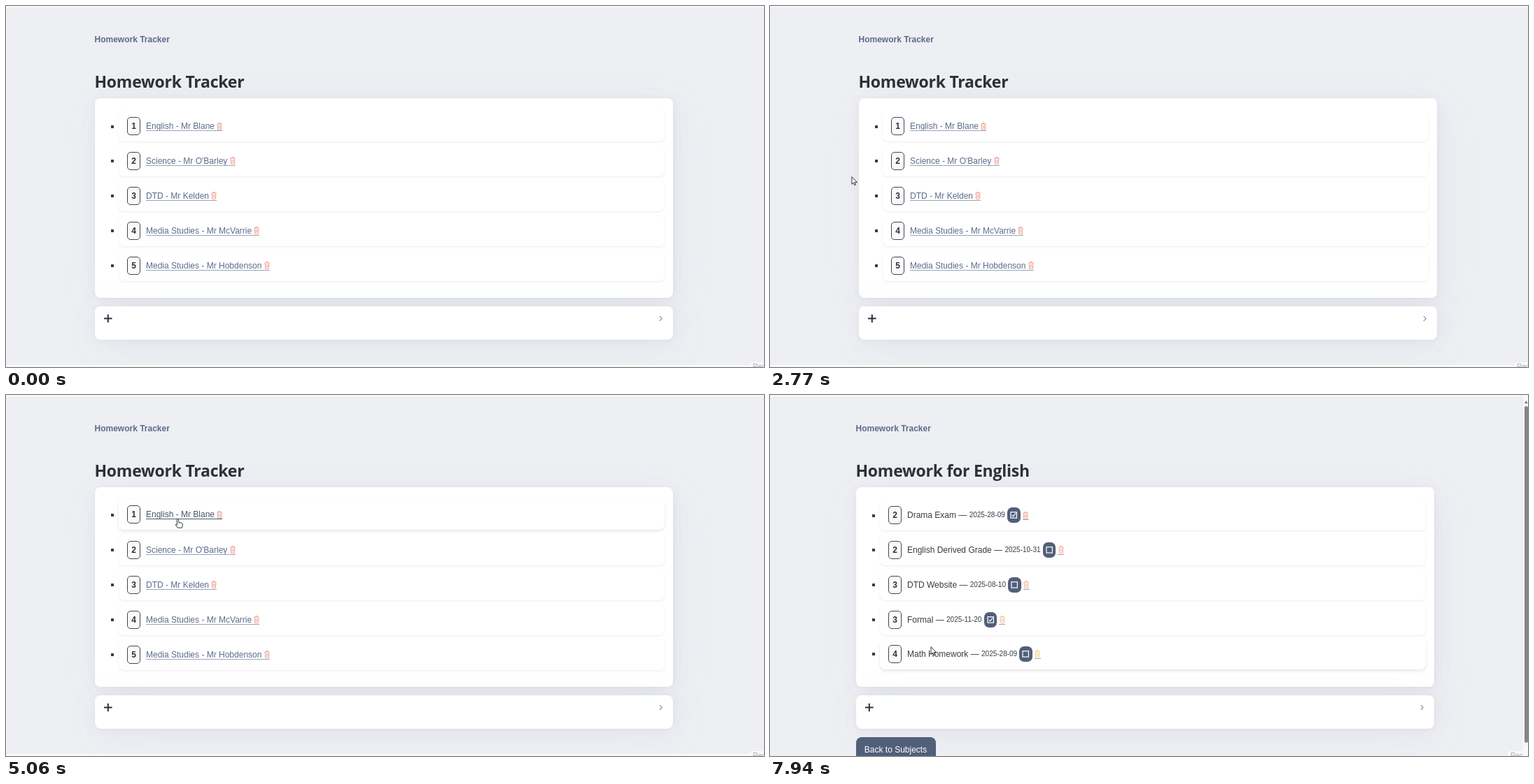
These frames come from a looping animation (1083 px wide and 517 px high, 8 s). An HTML page:

```html
<!DOCTYPE html>
<html lang="en">
<head>
<meta charset="utf-8">
<title>Homework Tracker</title>
<style>
html, body { margin: 0; width: 100%; height: 100%; overflow: hidden; }
body { position: relative; background: #eeeff3; color: #373c44; font: 12px/20px "Liberation Sans", Arial, sans-serif; }
.page, .page > *, .row, .cursor { position: absolute; }
.page { left: 0; top: 0; width: 1083px; height: 517px; overflow: hidden; }
.top, .bottom { left: 0; width: 100%; background: #f9f9fa; }
.top { top: 0; height: 2px; }
.bottom { top: 514px; height: 3px; }
.body { left: 0; top: 0; }
.body > * { position: absolute; white-space: pre; }
.brand { left: 126.5px; top: 38px; font-weight: 700; color: #5d6b89; }
.brand.on { color: #48536b; }
h1 { left: 126.5px; top: 91.5px; margin: 0; font: 700 23px/32px "Open Sans", "Noto Sans", sans-serif; letter-spacing: -.25px; color: #2d3138; }
.card {
  left: 126.5px; width: 826.5px; border-radius: 8px; background: #fff;
  box-shadow: .17px .35px 2px rgba(129,145,181,.017), .4px .8px 4.8px rgba(129,145,181,.024),
    .75px 1.5px 9px rgba(129,145,181,.03), 1.35px 2.7px 16px rgba(129,145,181,.036),
    2.5px 5px 30px rgba(129,145,181,.043), 6px 12px 72px rgba(129,145,181,.06),
    0 0 0 .75px rgba(129,145,181,.015);
}
.subjects { top: 132px; height: 286px; }
.adder { top: 430px; height: 47.5px; }
.row { left: 161px; width: 780px; height: 44px; border-radius: 8px; background: #fff; box-shadow: 0 1px 3px rgba(0,0,0,.08); }
.row.on { transform: translateY(-1px); box-shadow: 0 2px 4px rgba(0,0,0,.1); }
.row > * { position: absolute; }
.dot { left: -11px; top: 20.5px; width: 4px; height: 4px; background: #373c44; }
.num { left: 12px; top: 9px; width: 17px; height: 24px; border: 1px solid #41454e; border-radius: 5px; background: #fafafb; font-weight: 700; line-height: 24px; text-align: center; color: #2d3138; }
.line { left: 39px; top: 12px; height: 20px; white-space: pre; }
.link { color: #5d6b89; }
.link::after, .bin::after { content: ""; position: absolute; left: 0; right: 0; top: 16px; height: 1px; background: #9aa4b9; }
.on .link { color: #48536b; }
.on .link::after { background: #48536b; }
.task { display: flex; }
.task small { font-size: 10px; line-height: 20.6px; }
.check { width: 18.5px; height: 22px; margin: -1px 3px 0 3.3px; border-radius: 7px; background: #525f7a; }
.bin { position: relative; width: 9px; }
svg { display: block; overflow: visible; fill: none; }
.trash { display: inline-block; width: 8px; height: 11px; vertical-align: -1.5px; stroke-width: .8; }
.bin .trash { position: absolute; left: .5px; top: 4.5px; }
.back { left: 122.5px; top: 489.5px; width: 114px; height: 37px; border-radius: 8px; background: #525f7a; color: #fff; line-height: 37px; text-align: center; }
.tip { left: 1063px; top: 510px; width: 40px; height: 12px; border-radius: 4px 0 0 0; background: #f8f8fa; color: #a9abb0; font-size: 10px; line-height: 13px; text-indent: 4px; }
.back + .tip { left: 1054px; }
.scroll { left: 1076px; top: 0; width: 7px; height: 517px; background: #f8f8f9; }
.cursor { left: 0; top: 0; }
.cursor path { stroke: #30323a; stroke-linejoin: round; stroke-linecap: round; fill: #fff; }
</style>
</head>
<body>
<script>
const LOOP = 8000, START = 520, RELEASE = 5460, OPEN = 5600, LAG = 110;
const SUBJECTS = ["English - Mr Blane", "Science - Mr O'Barley", "DTD - Mr Kelden",
  "Media Studies - Mr McVarrie", "Media Studies - Mr Hobdenson"];
const TASKS = [
  [2, "Drama Exam", "2025-28-09", true],
  [2, "English Derived Grade", "2025-10-31", false],
  [3, "DTD Website", "2025-08-10", false],
  [3, "Formal", "2025-11-20", true],
  [4, "Math Homework", "2025-28-09", false]
];
// Stops of the pointer: time, x, y. It eases from one to the next.
const STOPS = [
  [START, 1027, 500], [940, 210, 38], [1600, 240, 425], [1980, 262, 172], [2100, 347.5, 326.5],
  [2560, -12, 270], [2970, 235, 222], [3580, 224, 270], [4380, 234, 371], [4600, 236, 371],
  [5000, 245.5, 177.5], [OPEN, 245.5, 177.5], [6930, 240, 226], [7940, 230, 361]
];
const SHAPES = {
  arrow: "M0 0V10.3L2.4 8.2L4 11.8L5.6 11.1L4 7.6H7.2Z",
  hand: "M-1.2 .8Q0 -.9 1.2 .8V5L5 5.6Q6.8 6.2 6.8 7.6V9.5Q6.6 11.3 5.6 12.7H-.2Q-1.5 10.4 -3.2 8.3Q-3.4 6.6 -1.2 8Z",
  beam: "M-2 -5.5H2M0 -5.5V5.5M-2 5.5H2"
};

const rowY = i => 172 + 49.9 * i;
const add = (parent, cls, html = "", tag = "div") => {
  const el = document.createElement(tag);
  el.className = cls;
  el.innerHTML = html;
  parent.append(el);
  return el;
};
const trash = hue => `<svg class="trash" viewBox="0 0 8 11" stroke="hsl(${hue} 78% 72%)">
  <path d="M.4 2H7.6M2.8 2V.6H5.2V2M1.1 2L1.6 10.4H6.4L6.9 2M3 3.8V8.8M5 3.8V8.8"/></svg>`;
const check = done => `<svg width="18.5" height="22" stroke="#fff" stroke-width="1.2">
  <rect x="5" y="6.7" width="8.4" height="8.4"/>${done ? '<path d="M6.6 10.8L8.6 12.8L12.2 8.2"/>' : ""}</svg>`;
const subjectLine = (name, i) => [i + 1, "link", `${name} ${trash(8)}`];
const taskLine = ([num, name, date, done], i) => [num, "task",
  `<span>${name} — </span><small>${date}</small><span class="check">${check(done)}</span><span class="bin">${trash(8 + 7 * i)}</span>`];

function makePage(title, shift, lines) {
  const page = add(document.body, "page");
  add(page, "top");
  const body = add(page, "body");
  body.style.left = shift + "px";
  const brand = add(body, "brand", "Homework Tracker");
  add(body, "", title, "h1");
  add(body, "card subjects");
  add(body, "card adder", `<svg width="826" height="47">
    <path d="M13 17.5H24.6M18.8 11.7V23.3" stroke="#2d3138" stroke-width="2"/>
    <path d="M806.8 14.2L810.2 17.7L806.8 21.2" stroke="#8b9099" stroke-width="1.2"/></svg>`);
  const rows = lines.map(([num, cls, html], i) => {
    const row = add(body, "row", `<i class="dot"></i><b class="num">${num}</b><div class="line ${cls}">${html}</div>`);
    row.style.top = rowY(i) - 22 + "px";
    return row;
  });
  const widths = rows.map(r => (r.querySelector(".check")?.offsetLeft) ?? r.lastChild.offsetWidth);
  return { page, brand, rows, widths, shift };
}

const list = makePage("Homework Tracker", 0, SUBJECTS.map(subjectLine));
add(list.page, "bottom");
add(list.page, "tip", "Record");

const detail = makePage("Homework for English", -4, TASKS.map(taskLine));
add(detail.page, "back", "Back to Subjects");
add(detail.page, "tip", "Record");
add(detail.page, "scroll", `<svg width="7" height="517" fill="#858585">
  <path d="M2 12L4.3 8L6.6 12Z" fill="#777"/><rect x="2" y="16" width="5" height="482" rx="2.5" fill="#858585"/></svg>`);

const cursor = add(document.body, "cursor", '<svg width="1" height="1"><path/></svg>');
const glyph = cursor.querySelector("path");

function pointAt(t) {
  const next = STOPS.findIndex(s => s[0] > t);
  if (next <= 0) return STOPS.at(next).slice(1);
  const [t0, x0, y0] = STOPS[next - 1], [t1, x1, y1] = STOPS[next];
  const k = (t - t0) / (t1 - t0), e = k * k * (3 - 2 * k);
  return [x0 + (x1 - x0) * e, y0 + (y1 - y0) * e];
}
const rowAt = ([x, y], { rows, shift }) =>
  x < 161 + shift || x > 941 + shift ? -1 : rows.findIndex((_, i) => Math.abs(y - rowY(i)) < 22);

function cursorKind(x, y, t, view, onBrand) {
  const row = rowAt([x, y], view), left = 200 + view.shift;
  const onText = row >= 0 && Math.abs(y - rowY(row)) < 7 && x > left && x < left + view.widths[row];
  if (onBrand || (onText && t < RELEASE)) return "hand";
  return onText && view === detail ? "beam" : "arrow";
}

function draw(t) {
  const view = t < OPEN ? list : detail;
  for (const p of [list, detail]) p.page.style.visibility = p === view ? "visible" : "hidden";
  cursor.style.visibility = t < START ? "hidden" : "visible";

  // Rows react a little after the pointer has reached them.
  const hot = rowAt(pointAt(t - LAG), view);
  view.rows.forEach((r, i) => r.classList.toggle("on", i === hot));

  const [x, y] = pointAt(t);
  const onBrand = x > 126 && x < 235 && y > 38 && y < 58;
  view.brand.classList.toggle("on", onBrand);
  glyph.setAttribute("d", SHAPES[cursorKind(x, y, t, view, onBrand)]);
  cursor.style.transform = `translate(${x}px, ${y}px)`;
}

const begin = performance.now();
function tick() {
  draw((performance.now() - begin) % LOOP);
  requestAnimationFrame(tick);
}
tick();
</script>
</body>
</html>
```
